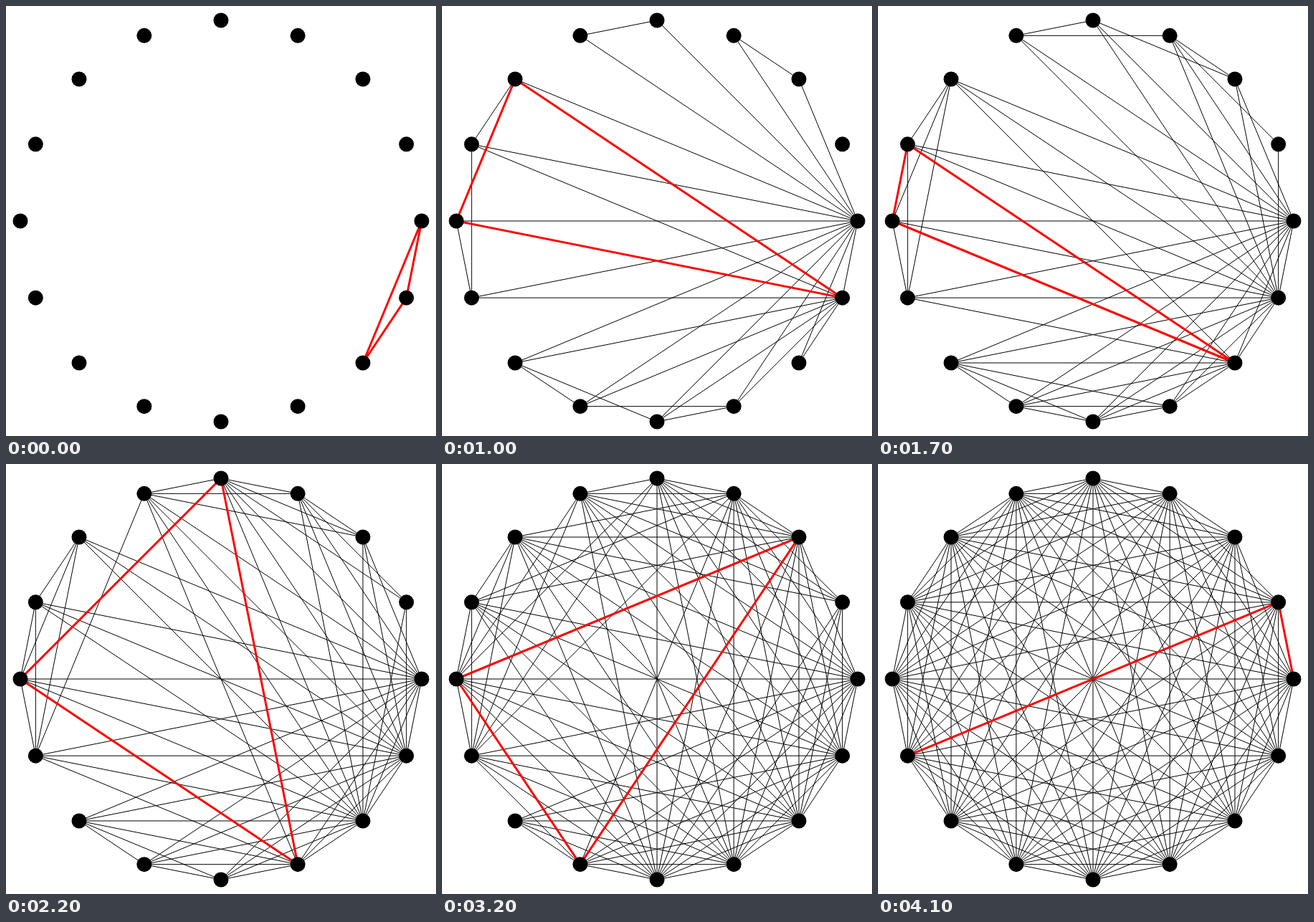
Write an HTML page with a canvas that moves like this. It is 600 by 600 pixels and loops after 4200 ms.

```html
<!DOCTYPE html>
<html lang="en">
<head>
<meta charset="utf-8">
<title>Triangles in a complete graph</title>
<style>
html, body { margin: 0; width: 100%; height: 100%; overflow: hidden; background: #fff; }
canvas { display: block; width: 600px; height: 600px; }
</style>
</head>
<body>
<canvas id="stage" width="600" height="600"></canvas>
<script>
const ctx = document.getElementById('stage').getContext('2d');
const N = 16, STEP = 100;

// Vertices are numbered 1..16, clockwise from the right.
const point = v => {
  const angle = (v - 1) * 2 * Math.PI / N;
  return [300 + 280 * Math.cos(angle), 300 + 280 * Math.sin(angle)];
};

// Triangles a ^ b ^ c = 0 on vertices 1..15; two-edge paths then bring in 16.
const steps = [];
for (let a = 1; a <= 8; a++) {
  for (let b = a + 1; b < N; b++) {
    const c = a ^ b;
    if (c > b) steps.push([a, b, c, a]);
  }
  if (a > 1) steps.push([a, N, a < 8 ? N - a : 1]);
}

function trace(path, color, width) {
  ctx.beginPath();
  path.forEach((v, i) => ctx[i ? 'lineTo' : 'moveTo'](...point(v)));
  ctx.strokeStyle = color;
  ctx.lineWidth = width;
  ctx.stroke();
}

function draw(current) {
  ctx.fillStyle = '#fff';
  ctx.fillRect(0, 0, 600, 600);
  for (let i = 0; i < current; i++) trace(steps[i], '#000', 1);
  trace(steps[current], '#f00', 3);
  ctx.fillStyle = '#000';
  for (let v = 1; v <= N; v++) {
    ctx.beginPath();
    ctx.arc(...point(v), 10.5, 0, 2 * Math.PI);
    ctx.fill();
  }
}

const start = performance.now();
let shown = -1;
function tick() {
  const elapsed = Math.max(0, performance.now() - start);
  const current = Math.floor(elapsed / STEP) % steps.length;
  if (current !== shown) draw(shown = current);
  requestAnimationFrame(tick);
}
tick();
</script>
</body>
</html>
```
